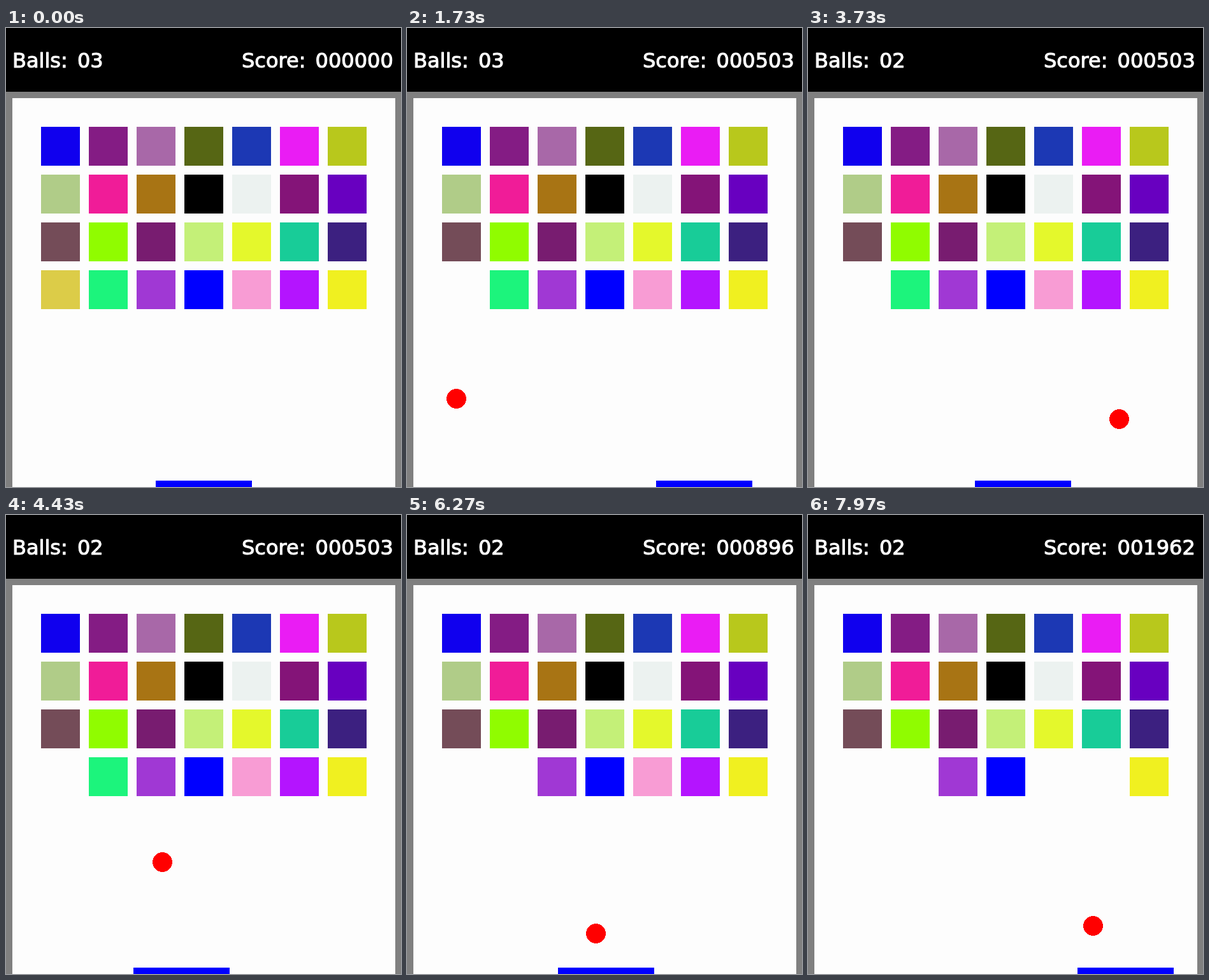
These frames come from a looping animation (620 by 720 pixels, 8000 ms). An HTML page:

```html
<!DOCTYPE html>
<html lang="en">
<head>
<meta charset="utf-8">
<title>Brick breaker</title>
<style>
  html, body { margin: 0; width: 100%; height: 100%; overflow: hidden; background: #000; }
  svg { display: block; width: 620px; height: 720px; }
  text {
    font: 32px "DejaVu Sans", sans-serif; word-spacing: 5px;
    fill: #fff; stroke: #fff; stroke-width: 1.1px; stroke-linejoin: round;
  }
</style>
</head>
<body>
<svg viewBox="0 0 620 720">
  <rect width="620" height="720"/>
  <rect y="100" width="620" height="620" fill="#808080"/>
  <rect x="10" y="110" width="601" height="610" fill="#fdfdfd"/>
  <g id="bricks" shape-rendering="crispEdges"></g>
  <rect id="paddle" y="710" width="151" height="10" fill="#00f"/>
  <circle id="ball" r="15.5" fill="#f00" shape-rendering="crispEdges"/>
  <text id="lives" x="10" y="62"></text>
  <text id="score" x="370" y="62"></text>
</svg>
<script>
const LOOP = 8000, FPS = 30, COLUMNS = 7;
const LEFT = 24.5, RIGHT = 596;   // limits of the ball's centre
const $ = id => document.getElementById(id);

const colors = `
  #1000ee #841c84 #a868a8 #566614 #1c38b4 #ea1cf4 #b8c81c
  #b0cc88 #f01c98 #a87414 #000000 #ecf2f0 #841478 #6800c0
  #744c58 #90fc00 #781c70 #c4f078 #e4f82c #18cc98 #3c2080
  #dccc48 #1cf47c #a038d4 #0000ff #f89cd4 #b414ff #f0f020`.trim().split(/\s+/);

// Times are in steps of 1/30 s. A flight runs [time, x, y] from the launch
// through brick and paddle hits; x is unfolded past the side walls.
const flights = [
  [[7.5, 332, 695], [41.3, 0.5, 455], [65, -63, 735]],
  [[87, 413, 695.5], [160.6, 1267.3, 453.9], [184, 1414, 697], [208, 1567.5, 455], [240, 1897.8, 650.7]]
];
const paddlePath = [
  [0, 235], [52, 391], [69, 391], [162, 113], [168, 113],
  [188, 237], [194, 314], [200, 245], [233, 458], [239, 423]
];
const hits = [
  { at: 42, column: 0, points: 503 },
  { at: 161, column: 1, points: 393 },
  { at: 208, column: 4, points: 533 },
  { at: 208, column: 5, points: 533 }
];

const bricks = colors.map((fill, i) => {
  const rect = document.createElementNS('http://www.w3.org/2000/svg', 'rect');
  const x = 55 + 75 * (i % COLUMNS), y = 155 + 75 * Math.floor(i / COLUMNS);
  const attrs = { x, y, width: 61, height: 61, fill };
  for (const name in attrs) rect.setAttribute(name, attrs[name]);
  return $('bricks').appendChild(rect);
});
const bottomRow = bricks.slice(-COLUMNS);

const endTime = path => path[path.length - 1][0];

// Linear interpolation along [time, ...values] points.
function along(path, t) {
  let i = 1;
  while (i < path.length - 1 && path[i][0] < t) i++;
  const a = path[i - 1], b = path[i];
  const k = (t - a[0]) / (b[0] - a[0]);
  return a.slice(1).map((v, j) => v + (b[j + 1] - v) * k);
}

// Reflects an unfolded x back and forth between the side walls.
function fold(x) {
  const span = RIGHT - LEFT, period = 2 * span;
  const phase = ((x - LEFT) % period + period) % period;
  return LEFT + span - Math.abs(span - phase);
}

function draw(step) {
  const flight = flights.find(path => step >= path[0][0] && step < endTime(path));
  $('ball').style.display = flight ? '' : 'none';
  if (flight) {
    const [x, y] = along(flight, step);
    $('ball').setAttribute('cx', Math.floor(fold(x)) + 0.5);
    $('ball').setAttribute('cy', Math.floor(y) + 0.5);
  }
  $('paddle').setAttribute('x', Math.round(along(paddlePath, step)[0]));

  let total = 0;
  for (const { at, column, points } of hits) {
    const broken = step >= at;
    bottomRow[column].style.display = broken ? 'none' : '';
    if (broken) total += points;
  }
  $('score').textContent = 'Score: ' + String(total).padStart(6, '0');
  $('lives').textContent = 'Balls: ' + (step < endTime(flights[0]) ? '03' : '02');
}

const start = performance.now();
function tick() {
  const time = Math.max(0, performance.now() - start) % LOOP;
  // Steps last 30 or 40 ms, rounded down to a multiple of 10.
  draw(Math.min(239, Math.floor((time + 4) * FPS / 1000)));
  requestAnimationFrame(tick);
}
tick();
</script>
</body>
</html>
```
